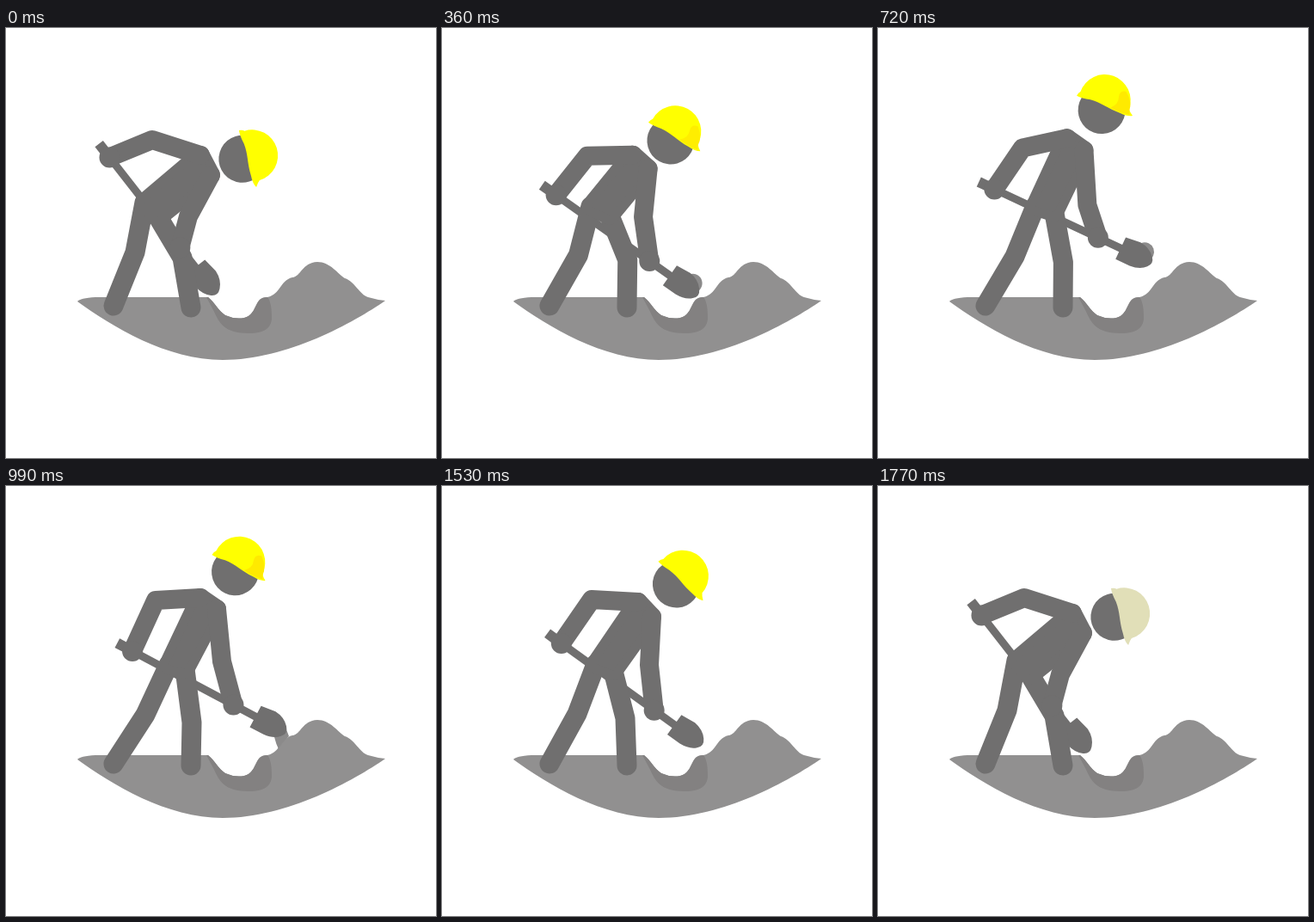
An HTML page with a canvas that plays this animation: 500x500 px, repeating every 1830 ms.

```html
<!DOCTYPE html>
<html lang="en">
<head>
<meta charset="utf-8">
<title>Digging worker</title>
<style>
  html, body { margin: 0; width: 100%; height: 100%; overflow: hidden; background: #fff; }
  canvas { display: block; width: 500px; height: 500px; }
</style>
</head>
<body>
<canvas id="stage" width="500" height="500"></canvas>
<script>
const LOOP = 1830, STEP = 30, REST = 1770;
const BODY = '#706f6f', SOIL = '#919090', PIT = '#838181', CLUMP = '#8b8a8a';
const ctx = document.getElementById('stage').getContext('2d');

const TIMES = [0, 150, 510, 990, 1320, 1530];
const LIFT = 750;

// A track holds one value set per key time and returns to the first at REST.
function track(values, lift) {
  const keys = values.map((v, i) => [TIMES[i], v]);
  if (lift) keys.splice(3, 0, [LIFT, lift]);
  keys.push([REST, values[0]]);
  return keys;
}

const tracks = {
  // x, y, angle in degrees
  shovel: track([[110, 137, 52], [125, 178, 48], [115, 186, 28], [132, 184, 28], [129, 186, 25.6], [125, 173, 35.8]], [121, 180, 25]),
  helmet: track([[281, 152, 73], [284.5, 150.5, 56], [261.5, 106, 19], [270.5, 95, 26], [265, 93.5, 25], [277.5, 110.5, 41]], [264, 90, 20]),
  // x, y
  backShoulder: track([[226, 148], [228, 159], [218, 137], [226, 130], [221, 129], [228, 135]], [220, 128]),
  frontShoulder: track([[238, 171], [244, 180], [237, 150], [245, 143], [239, 142], [244, 152]], [240, 142]),
  backElbow: track([[170, 130], [177, 151], [164, 146], [174, 133], [166, 136], [174, 132]]),
  frontElbow: track([[212, 219], [231, 237], [236, 208], [251, 204], [248, 200], [241, 208]]),
  backHip: track([[161, 203], [168, 209], [176, 207], [189, 208], [187, 207], [179, 207]]),
  frontHip: track([[177, 220], [185, 220], [200, 216], [208, 213], [206, 213], [199, 215]]),
  backKnee: track([[150, 261], [161, 262], [157, 265], [162, 266], [160, 266], [157, 265]]),
  frontKnee: track([[205, 267], [217, 269], [215, 270], [216, 275], [216, 275], [213, 270]]),
  shade: track([[0], [0.3], [1], [1], [1], [0]])
};
const BACK_FOOT = [125, 323], FRONT_FOOT = [215, 325];

// Monotone cubic interpolation: passes each key without overshoot.
function sample(keys, t) {
  let i = 0;
  while (i < keys.length - 2 && t >= keys[i + 1][0]) i++;
  const [t0, a] = keys[i], [t1, b] = keys[i + 1];
  const h = t1 - t0, u = (t - t0) / h;
  const slope = (k, c) => (keys[k + 1][1][c] - keys[k][1][c]) / (keys[k + 1][0] - keys[k][0]);
  const tangent = (k, c) => {
    if (k === 0 || k === keys.length - 1) return 0;
    const p = slope(k - 1, c), q = slope(k, c);
    return p * q <= 0 ? 0 : 2 * p * q / (p + q);
  };
  return a.map((v, c) => {
    const w = u * u * (3 - 2 * u);
    return v + (b[c] - v) * w
      + h * u * (1 - u) * ((1 - u) * tangent(i, c) - u * tangent(i + 1, c));
  });
}

const ground = new Path2D(`M83 318 Q86 314 104 313 L235 313
  C243 319 246 328 255 334 Q266 339 277 337 C289 334 289 322 295 316
  Q298 313 304 313 C320 309 318 294 333 290 C343 289 344 273 362 272
  C377 272 386 286 394 291 C406 295 411 310 421 313 Q431 316 441 317
  C405 342 327 386 252 386 C187 386 123 347 83 318Z`);
const pit = new Path2D(`M233 313 L235 313 C243 319 246 328 255 334 Q266 339 277 337
  C289 334 289 322 295 316 Q298 313 304 313 C308 318 309 326 309 337
  C309 350 298 355 283 355 C252 355 248 342 241 328Z`);
const blade = new Path2D('M0 -14 L18 -16 Q30 -15 37 -7 Q43 0 37 6 Q31 13 18 14 L0 14Z');
const helmet = new Path2D(`M-34.5 0 Q-34 -4 -32 -6 A30 30 0 0 1 28 -6
  Q30 -3 34.5 0 Q29 3 20 2 C4 2 -4 -2 -18 -1 Q-28 1 -34.5 0Z`);
const shade = new Path2D('M7 0 Q15 -7 12 -15 Q10 -23 18 -24 Q29 -15 29 -4 L31 0 Q18 2 7 0Z');

function fill(path, color) {
  ctx.fillStyle = color;
  ctx.fill(path);
}

function limb(points, width) {
  ctx.lineWidth = width;
  ctx.beginPath();
  points.forEach(p => ctx.lineTo(p[0], p[1]));
  ctx.stroke();
}

function disc(x, y, r, color) {
  ctx.fillStyle = color;
  ctx.beginPath();
  ctx.arc(x, y, r, 0, 2 * Math.PI);
  ctx.fill();
}

function within([x, y, deg], draw) {
  ctx.save();
  ctx.translate(x, y);
  ctx.rotate(deg * Math.PI / 180);
  draw();
  ctx.restore();
}

function along([x, y, deg], d) {
  const a = deg * Math.PI / 180;
  return [x + d * Math.cos(a), y + d * Math.sin(a)];
}

function drawFallingSoil(t) {
  if (t < 900 || t >= 1080) return;
  const drop = (t - 990) * 0.14;
  ctx.save();
  ctx.clip(new Path2D('M290 240 H345 V288 L314 308 L290 306Z'));
  ctx.translate(0, drop);
  fill(new Path2D('M309 285 L326 283 L329 291 Q321 298 317 306 Q314 300 312 292Z'), CLUMP);
  ctx.restore();
}

function drawShovel(pose, t) {
  within(pose, () => {
    ctx.fillStyle = BODY;
    ctx.fillRect(-3, -6, 12, 12);
    ctx.fillRect(0, -4.5, 182, 9);
    ctx.translate(179, 0);
    if (t >= 120 && t < 930) disc(27, -8, 11, CLUMP);
    fill(blade, BODY);
  });
}

function drawHead(pose, shadeLevel, t) {
  within(pose, () => {
    disc(-1.5, 6, 27.5, BODY);
    fill(helmet, t >= REST ? '#e1dfb8' : '#ff0');
    ctx.globalAlpha = shadeLevel;
    fill(shade, '#ffea00');
  });
}

function draw(t) {
  const p = {};
  for (const name in tracks) p[name] = sample(tracks[name], Math.min(t, REST));
  const backHand = along(p.shovel, 17), frontHand = along(p.shovel, 150);

  ctx.fillStyle = '#fff';
  ctx.fillRect(0, 0, 500, 500);
  fill(ground, SOIL);
  fill(pit, PIT);
  drawFallingSoil(t);
  drawShovel(p.shovel, t);

  ctx.strokeStyle = ctx.fillStyle = BODY;
  ctx.lineCap = ctx.lineJoin = 'round';
  limb([p.backHip, p.backKnee, BACK_FOOT], 23);
  limb([p.frontHip, p.frontKnee, FRONT_FOOT], 23);
  limb([p.backShoulder, p.frontShoulder, p.frontHip, p.backHip, p.backShoulder], 22);
  ctx.fill();
  limb([p.backShoulder, p.backElbow, backHand], 22);
  limb([p.frontShoulder, p.frontElbow, frontHand], 22);
  disc(...backHand, 12, BODY);
  disc(...frontHand, 12, BODY);
  drawHead(p.helmet, p.shade[0], t);
}

const start = performance.now();
function tick() {
  const t = (performance.now() - start) % LOOP;
  draw(Math.floor(t / STEP) * STEP);
  requestAnimationFrame(tick);
}
tick();
</script>
</body>
</html>
```
